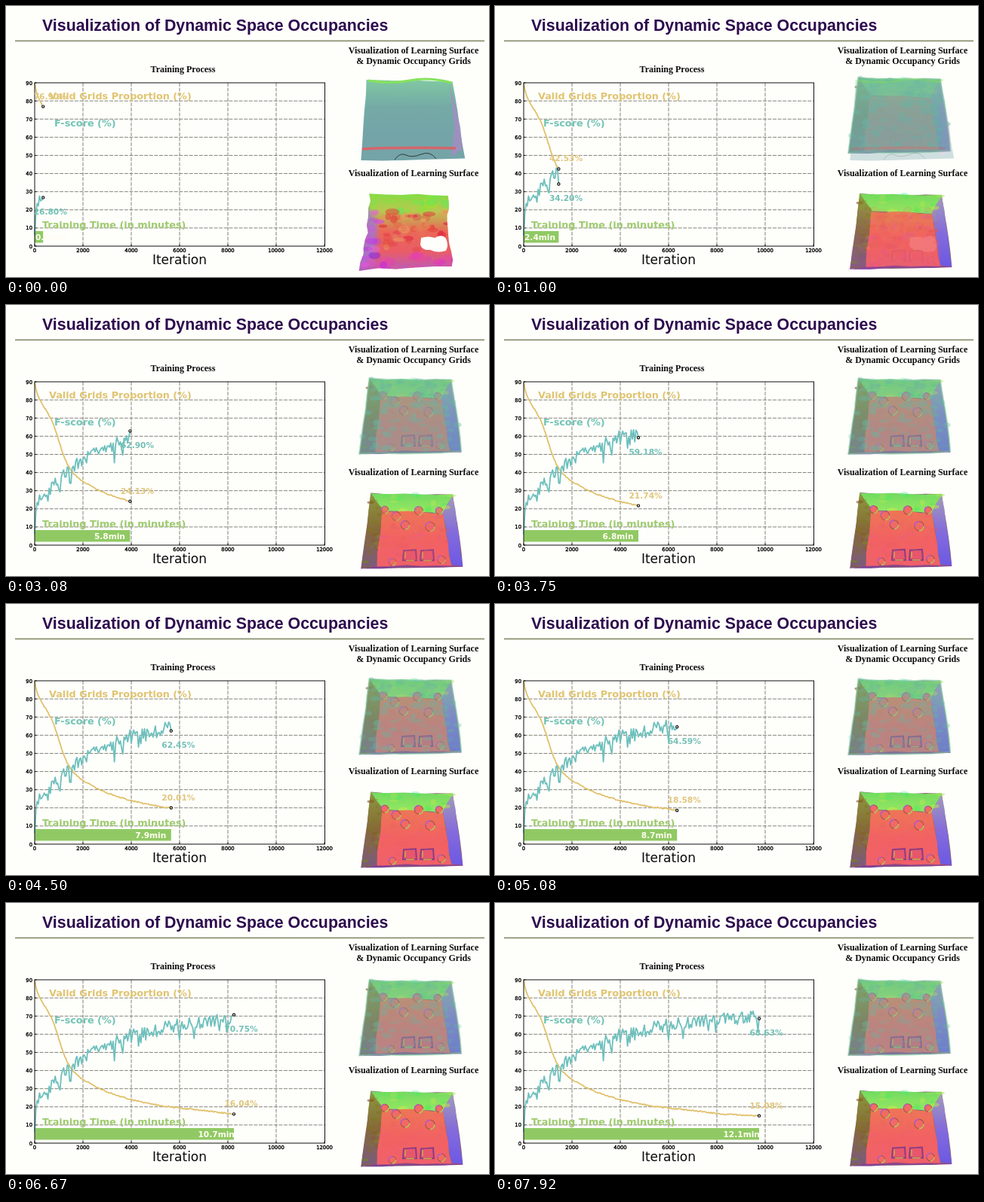
Animation, 640 px wide and 360 px high, one loop 8 s. Source, as an HTML page:

```html
<!DOCTYPE html>
<html lang="en">
<head>
<meta charset="utf-8">
<title>Visualization of Dynamic Space Occupancies</title>
<style>
  html, body { margin: 0; width: 100%; height: 100%; overflow: hidden; background: #fefefb; }
  svg { display: block; width: 100vw; height: 100vh; }
  .title { font: bold 21.34px "Liberation Sans", Arial, sans-serif; fill: #2d0b4e; }
  .head { font: bold 12px "Liberation Serif", Times, serif; fill: #0c0c0c; text-anchor: middle; }
  .tick { font: 6.8px "DejaVu Sans", sans-serif; fill: #0c0c0c; stroke: #0c0c0c; stroke-width: .4; }
  .axis { font: 17px "DejaVu Sans", sans-serif; fill: #0c0c0c; text-anchor: middle; }
  .name { font: bold 12.8px "DejaVu Sans", sans-serif; }
  .value { font: bold 10.6px "DejaVu Sans", sans-serif; }
  .line { fill: none; stroke-width: 1.8; stroke-linejoin: round; }
  .grid { stroke: #85857a; stroke-width: 1; stroke-dasharray: 5 1.6; }
  .dot { fill: #fefefb; stroke: #111; stroke-width: 1.2; }
</style>
</head>
<body>
<svg viewBox="0 0 640 360" preserveAspectRatio="none">
  <defs id="defs">
    <filter id="soft"><feGaussianBlur stdDeviation=".6"/></filter>
    <filter id="haze"><feGaussianBlur stdDeviation="3"/></filter>
    <clipPath id="blobClip"><path id="blobEdge"/></clipPath>
  </defs>
  <rect width="640" height="360" fill="#fefefb"/>
  <text class="title" x="48" y="33">Visualization of Dynamic Space Occupancies</text>
  <path d="M12 46.4H634" stroke="#8a9272" stroke-width="1.6"/>
  <text class="head" x="234.5" y="88">Training Process</text>
  <text class="head" x="540" y="63">Visualization of Learning Surface</text>
  <text class="head" x="540" y="77">&amp; Dynamic Occupancy Grids</text>
  <text class="head" x="540" y="226">Visualization of Learning Surface</text>
  <g id="axes"></g>
  <rect id="bar" x="38" y="299" height="15.5" fill="#90c964"/>
  <path id="validLine" class="line" stroke="#e0c16b"/>
  <path id="scoreLine" class="line" stroke="#6ec0bd"/>
  <rect x="38" y="102" width="384.5" height="217" fill="none" stroke="#111"/>
  <text class="name" x="57" y="124" fill="#e0c470">Valid Grids Proportion (%)</text>
  <text class="name" x="64" y="160" fill="#73c4b6">F-score (%)</text>
  <text class="name" x="48" y="294.6" fill="#9ecb6e">Training Time (in minutes)</text>
  <text id="validText" class="value" fill="#e0c67c"></text>
  <text id="scoreText" class="value" fill="#73c0b6"></text>
  <text id="timeText" class="value" y="310.6" fill="#fffdf0"></text>
  <circle id="validDot" class="dot" r="1.6"/>
  <circle id="scoreDot" class="dot" r="1.6"/>
  <g id="scenes"></g>
</svg>
<script>
const $ = id => document.getElementById(id);
const set = (id, attrs) => { for (const k in attrs) $(id).setAttribute(k, attrs[k]); };
const px = it => 38 + it * 0.032;
const py = v => 319 - v * 2.411;
const clamp = v => Math.max(0, Math.min(1, v));
const ramp = (t, a, b) => clamp((t - a) / (b - a));
const mix = ([a, b], [c, d], f) => [a + (c - a) * f, b + (d - b) * f];

function seeded(s) {
  return () => (s = (s * 1664525 + 1013904223) >>> 0) / 4294967296;
}

// Readouts: iteration, valid grids, F-score, minutes
const readouts = [
  [350, 76.9, 26.8, 0.6], [2650, 30.2, 50.3, 4.3], [3950, 24.13, 62.9, 5.8], [5650, 20.01, 62.45, 7.9],
  [7050, 17.88, 69.23, 9.4], [8250, 16.04, 70.75, 10.7], [9750, 15.08, 68.63, 12.1]];

// Linear interpolation of f(readout) over the iterations
function along(it, f) {
  let i = 1;
  while (i < readouts.length - 1 && readouts[i][0] < it) i++;
  const a = readouts[i - 1], b = readouts[i];
  return f(a) + (f(b) - f(a)) * ramp(it, a[0], b[0]);
}

// Slow decay, a quick first drop and one sigmoid step
const decay = it => 13.5 + 44.8 * Math.exp(-it / 2925) + 7.5 * Math.exp(-it / 120)
  + 24 / (1 + Math.exp((it - 1020) / 190));
const growth = it => 71.5 - 48.5 * Math.exp(-it / 3000) - 17 * Math.exp(-it / 45);

const rnd = seeded(29);
const samples = [];
for (let it = 0; it <= 9750; it += 50) {
  const known = readouts.find(r => r[0] === it);
  const noise = (rnd() - 0.45) * 7 - 8 * rnd() ** 8;
  samples.push({
    it,
    valid: decay(it) + along(it, r => r[1] - decay(r[0])) + (known ? 0 : (rnd() - 0.5) * 0.7),
    score: known ? known[2] : growth(it) + noise * ramp(it, 0, 400),
  });
}

function buildAxes() {
  let out = '';
  for (let v = 0; v <= 90; v += 10) {
    const y = py(v);
    if (v && v < 90) out += `<path class="grid" d="M38 ${y}H422"/>`;
    out += `<path d="M38 ${y}h2.5" stroke="#111"/><text class="tick" x="35" y="${y + 2.5}" text-anchor="end">${v}</text>`;
  }
  for (let it = 0; it <= 12000; it += 2000) {
    const x = px(it);
    if (it && it < 12000) out += `<path class="grid" d="M${x} 102V319"/>`;
    out += `<path d="M${x} 319v-2.5" stroke="#111"/><text class="tick" x="${x}" y="327" text-anchor="middle">${it}</text>`;
  }
  $('axes').innerHTML = out + '<text class="axis" x="230" y="342.5">Iteration</text>';
}

// Corners run top left, top right, bottom right, bottom left
const rim = [[484, 250], [592, 252], [606, 347], [471, 350]];
const base = [[499, 273], [579, 276], [590, 345], [491, 346]];

// Polygon through the points, with each side cut up and shaken
function rough(pts, shake, seed) {
  const r = seeded(seed), j = () => (r() - 0.5) * 2 * shake, out = [];
  pts.forEach((p, i) => {
    for (let f = 0; f < 1; f += 0.2) {
      const [x, y] = mix(p, pts[(i + 1) % pts.length], f);
      out.push(`${(x + j()).toFixed(1)} ${(y + j()).toFixed(1)}`);
    }
  });
  return `M${out.join('L')}Z`;
}
const wall = i => [rim[i], rim[(i + 1) % 4], base[(i + 1) % 4], base[i]];

// Seeded ellipses over the area spanned by four corners
function speckles(seed, n, area, size, color) {
  const r = seeded(seed);
  let out = '';
  for (let i = 0; i < n; i++) {
    const u = r(), v = r();
    const [x, y] = mix(mix(area[0], area[1], u), mix(area[3], area[2], u), v);
    out += `<ellipse cx="${x}" cy="${y}" rx="${size * (0.4 + r())}" ry="${size * (0.3 + r() * 0.5)}"
      fill="${color(u, v, r())}" opacity="${0.25 + r() * 0.45}"/>`;
  }
  return out;
}

function gradients(list) {
  for (const id in list) {
    const stops = list[id].map((c, i, all) => `<stop offset="${i / (all.length - 1)}" stop-color="${c}"/>`).join('');
    $('defs').insertAdjacentHTML('beforeend', `<linearGradient id="${id}" x2="0" y2="1">${stops}</linearGradient>`);
  }
}

function bumps() {
  const r = seeded(4);
  const ring = ([x, y]) => {
    const s = 4.5 + r() * 2;
    return `<circle cx="${x}" cy="${y}" r="${s}" fill="#f26a62" stroke="#a8544e" stroke-width="1.2"/>
      <path d="M${x - s} ${y}a${s} ${s} 0 0 1 ${s} ${-s}" fill="none" stroke="#b85cc4" stroke-width="1.8"/>
      <path d="M${x} ${y + s}a${s} ${s} 0 0 0 ${s} ${-s}" fill="none" stroke="#b9c65a" stroke-width="1.6"/>`;
  };
  const box = x => `<path d="M${x} 326l16-1 1 14h-18z" fill="#e8566c" stroke="#8c3c86" stroke-width="2"/>
    <path d="M${x + 2} 328v8M${x + 3} 339h11" fill="none" stroke="#c8a84c" stroke-width="1.6"/>`;
  const spots = [[502, 272], [517, 280], [547, 273], [562, 294], [574, 273], [529, 292], [512, 341], [577, 338]];
  return spots.map(ring).join('') + box(527) + box(550);
}

function tray(id) {
  const faces = ['back', 'right', 'front', 'left'].map((name, i) =>
    `<path d="${rough(wall(i), 0.9, i + 2)}" fill="url(#${name})"/>`);
  const tint = (u, v, c) => `hsl(${c < 0.6 ? 350 + c * 50 : 290 + c * 50} 72% 62%)`;
  return `<g filter="url(#soft)">
    <path d="${rough(rim, 0.8, 8)}" fill="#8a6a72"/>${faces.join('')}
    ${speckles(12, 22, wall(3), 4, (u, v, c) => `hsl(${30 + c * 40} 60% 32%)`)}
    ${speckles(13, 16, wall(0), 5, (u, v, c) => `hsl(${75 + c * 70} 75% 62%)`)}
    <path d="${rough(base, 1.2, 6)}" fill="url(#floor)"/>
    <g id="${id}Bumps">${bumps()}</g>
    <g id="${id}Rough">${speckles(5, 50, base, 5, tint)}</g>
  </g>`;
}

function buildScenes() {
  gradients({
    back: ['#72da62', '#96e860'], right: ['#a49cb4', '#846cdc', '#6c58e4'], front: ['#a0487c', '#74409c'],
    left: ['#7a5a80', '#86683a', '#8c9a3c'].reverse(), floor: ['#ee7656', '#f26262', '#f0606a'],
    block: ['#80c8a2', '#74aaa6', '#74a4a8', '#74a4a8'], blob: ['#7ce040', '#b8c850', '#ea6858', '#ea5c66', '#b45cc4'],
  });
  const hue = (u, v, c) => v < 0.22 ? 75 + c * 50 : u < 0.15 ? 270 + c * 40 : v > 0.8 ? 290 + c * 65 : 345 + c * 50;
  const sheet = `<path d="${rough(rim, 1, 8)}" fill="#70b4a4"`;
  $('scenes').innerHTML = `
    <g id="gridTray">${tray('grid')}
      ${sheet} opacity=".42"/>
      ${sheet} id="veil"/>
      <g id="cells" filter="url(#soft)">${speckles(31, 80, rim, 6, () => '#68b4a0')}</g>
      <path d="${rough(rim, 1, 8)}" fill="none" stroke="#86cfa8" stroke-width="2" opacity=".6"/>
    </g>
    <g id="gridBlock" filter="url(#soft)">
      <path d="${rough([[478, 98], [592, 100], [608, 203], [471, 205]], 0.8, 3)}" fill="url(#block)"/>
      <path d="M480 99Q510 104 535 99T591 102" fill="none" stroke="#86e25c" stroke-width="3"/>
      <path d="M588 104L602 160L605 190L590 200L594 160Z" fill="#a98bc4" opacity=".75"/>
      <path d="M472 190Q530 187 596 189" fill="none" stroke="#d4656c" stroke-width="3.5"/>
      <path d="M515 204Q522 194 530 198T550 197T570 203" fill="none" stroke="#333b3c"/>
    </g>
    <g id="tray">${tray('main')}</g>
    <g id="early"><g clip-path="url(#blobClip)">
      <rect x="460" y="245" width="140" height="108" fill="url(#blob)"/>
      <path d="M478 262L492 290L490 330L466 350Z" fill="#9a78d8" opacity=".8" filter="url(#haze)"/>
      <g filter="url(#soft)">${speckles(9, 110, rim, 7, (u, v, c) => `hsl(${hue(u, v, c)} 75% ${50 + c * 16}%)`)}</g>
    </g><path d="M550 308Q560 305 568 308Q578 302 583 309Q587 318 583 325Q572 329 562 324Q551 325 549 317Z" fill="#fefefb"/></g>`;
}

function draw(t) {
  const k = Math.min(95, Math.floor((t + 4) * 0.012));
  const it = Math.max(350, 250 + 100 * k);
  const n = it / 50, x = px(it);

  for (const [key, dy] of [['valid', -10], ['score', 22.3]]) {
    const y = py(samples[n][key]);
    set(key + 'Line', { d: 'M' + samples.slice(0, n + 1).map(p => `${px(p.it).toFixed(1)} ${py(p[key]).toFixed(1)}`).join('L') });
    set(key + 'Dot', { cx: x, cy: y });
    set(key + 'Text', { x: x - 12.5, y: y + dy });
    $(key + 'Text').textContent = samples[n][key].toFixed(2) + '%';
  }
  set('bar', { width: x - 38 });
  set('timeText', { x: Math.max(39, x - 47.5) });
  $('timeText').textContent = along(it, r => r[3]).toFixed(1) + 'min';

  const s = k * 1000 / 12, sway = Math.sin(k * 1.9) * 0.4;
  set('blobEdge', { d: rough([[482, 249], [587, 251], [585, 295], [592, 346], [468, 351], [479, 300]], 1.8, k + 3) });
  set('early', { opacity: 1 - ramp(s, 350, 1100) });
  set('tray', { opacity: ramp(s, 80, 600), transform: `translate(0 ${sway})` });
  set('gridBlock', { opacity: 1 - ramp(s, 400, 1300) });
  set('gridTray', { opacity: ramp(s, 100, 800), transform: `translate(-2 ${sway - 154 + 7 * ramp(s, 1800, 7000)})` });
  set('veil', { opacity: 0.5 - 0.5 * ramp(s, 900, 4500) });
  set('cells', { opacity: 0.9 - 0.4 * ramp(s, 1500, 5500) });
  for (const id of ['main', 'grid']) {
    set(id + 'Bumps', { opacity: ramp(s, 600, 3600) });
    set(id + 'Rough', { opacity: 0.9 - 0.65 * ramp(s, 800, 4500) });
  }
}

buildAxes();
buildScenes();
const start = performance.now();
function loop() {
  draw((performance.now() - start) % 8000);
  requestAnimationFrame(loop);
}
loop();
</script>
</body>
</html>
```
